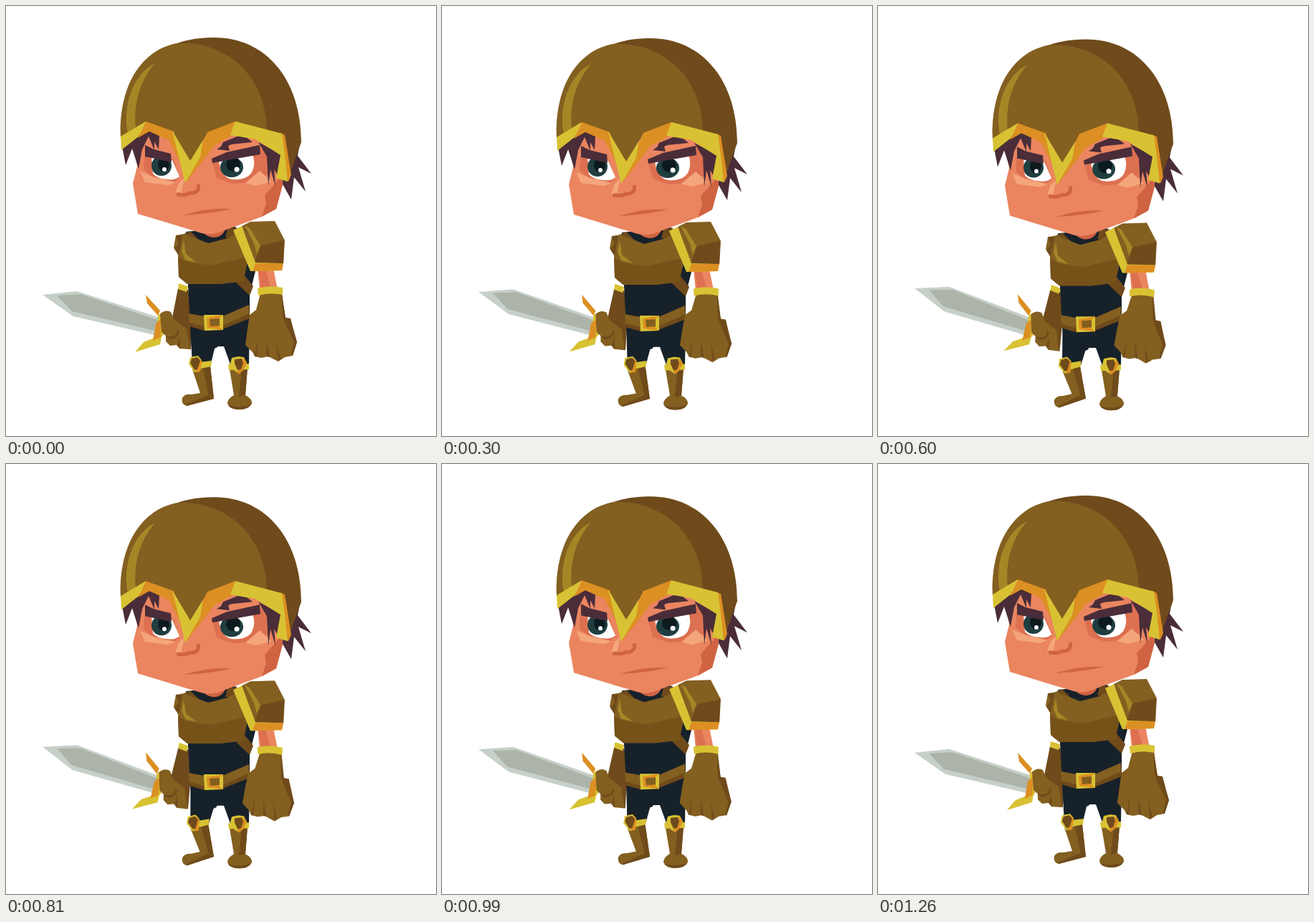
Write an HTML page that moves like this. It is 600 by 600 pixels and loops after 1320 ms.

```html
<!DOCTYPE html>
<html lang="en">
<head>
<meta charset="utf-8">
<title>Knight idle</title>
<style>
html, body { margin: 0; width: 100%; height: 100%; overflow: hidden; background: #fff; }
svg { display: block; width: 100vw; height: 100vh; }
.br { fill: #835f20; }
.dk { fill: #6f4a1b; }
.hi { fill: #a58626; }
.go { fill: #d8c233; }
.or { fill: #dc8f22; }
.nv { fill: #17212a; }
.sk { fill: #ea8560; }
.sh { fill: #d06341; }
.so { fill: #dd7051; }
.li { fill: #f5a57b; }
.ha { fill: #4a2d39; }
.ir { fill: #203e40; }
.pu { fill: #0c1a1e; }
.wh { fill: #fff; }
</style>
</head>
<body>
<svg viewBox="0 0 600 600">
  <g id="swordArm">
    <path fill="#c6d0c9" d="M51 403L99 398L215 435L207 459L94 433Z"/>
    <path fill="#acb4aa" d="M71 404L104 402L214 439L207 453L92 426Z"/>
    <path class="dk" d="M240 394L254 396L260 420L258 479L240 474L231 440Z"/>
    <path class="go" d="M241 387L254 391L252 399L240 395Z"/>
    <path class="go" d="M212 431L219 427L225 452L217 462L215 472L180 483L192 469L207 463L211 447Z"/>
    <path class="or" d="M195 403L215 425L212 432L197 415ZM209 443L216 437L216 462L205 467Z"/>
    <path class="br" d="M215 430Q222 423 230 427L235 438L252 450L257 479L242 478L238 473L229 474L223 468L223 460L217 455Z"/>
    <path class="dk" d="M222 460Q232 463 238 458L239 452L242 455Q240 463 229 465ZM239 473L242 460L243 478Z"/>
  </g>

  <g id="thighL"><path class="nv" d="M257 448L298 448L295 476L291 478L286 499L260 500Z"/></g>
  <g id="shinL">
    <path class="br" d="M260 507L285 502L290 548L252 558Q244 556 246 547Q249 541 259 542L271 540Z"/>
    <path class="dk" d="M275 506L285 502L290 548L252 558Q250 557 253 555L283 543Z"/>
    <path class="go" d="M259 498L287 495L286 503L261 508Z"/>
    <path class="go" d="M257 490L268 488L273 494L271 510L263 511L255 500Z"/>
    <path class="or" d="M268 490L273 495L271 510L264 511Z"/>
    <path class="dk" d="M259 492L267 490L271 495L267 507L263 508L257 498Z"/>
  </g>
  <g id="hips"><path class="nv" d="M257 442L340 436L339 500L313 500L304 475L292 475L259 474Z"/></g>
  <g id="shinR">
    <path class="br" d="M312 507L337 505L334 543Q344 548 343 555Q338 563 326 563Q312 563 309 555Q309 548 318 543Z"/>
    <path class="dk" d="M329 506L337 505L334 543L325 545ZM310 557Q326 562 342 556Q338 563 326 563Q314 563 310 557Z"/>
    <path class="go" d="M310 500L339 499L339 507L311 508Z"/>
    <path class="go" d="M315 491L324 489L332 490L336 498L331 508L325 513L319 509L313 499Z"/>
    <path class="or" d="M331 490L336 498L331 508L325 513L322 511L330 500Z"/>
    <path class="dk" d="M319 493L329 492L331 498L328 507L323 508L319 499Z"/>
  </g>

  <g id="body">
    <path class="nv" d="M251 315L320 308L349 366L340 402L340 440L257 447L254 390Z"/>
    <path class="dk" d="M246 319L257 314L270 327L260 330ZM309 311L322 309L326 325L306 323ZM333 376L345 391L340 404L321 386Z"/>
    <path class="br" d="M237 320L249 318L282 331L309 324L322 317L338 350L331 384L298 388L253 388L241 378L240 347L234 337Z"/>
    <path fill="#765219" d="M240 350L252 357L285 362L334 351L338 353L331 384L298 388L253 388L241 378Z"/>
    <path class="hi" d="M248 326L251 346L266 358L250 354L245 342Z"/>
    <path class="dk" d="M237 320L246 320L241 347L235 339L241 331Z"/>
    <path class="br" d="M255 429L277 433L302 433L339 417L340 435L302 450L277 452L256 446Z"/>
    <path class="dk" d="M256 442L277 447L302 446L340 429V436L302 451L277 453L256 447Z"/>
    <path class="go" d="M276 431L303 431L303 452L277 453Z"/>
    <path class="or" d="M280 435L303 431L303 452L281 449Z"/>
    <path class="go" d="M298 435L303 431L303 452L298 448Z"/>
    <path class="br" d="M284 437L298 436L298 446L285 447Z"/>
  </g>

  <g id="upperArm">
    <path class="sk" d="M351 365L373 366L379 396L354 397Z"/>
    <path class="so" d="M352 368L362 368L370 396L357 397Z"/>
  </g>
  <g id="foreArm">
    <path class="br" d="M355 401L385 400L390 435L397 436L399 446L406 469L400 488L389 490L380 496L366 489L356 491L347 489L344 483L334 473L337 450L340 431L349 424Z"/>
    <path class="dk" d="M384 400L390 435L397 436L406 469L400 488L398 486L402 469L391 446L386 434ZM347 489L351 466L350 489ZM364 489L363 466L368 490ZM380 494L377 468L383 493Z"/>
    <path class="go" d="M351 394Q368 389 386 393L386 403Q368 399 352 404Z"/>
  </g>
  <g id="pad">
    <path class="br" d="M329 307L341 301L375 300L389 327L387 360L346 360Z"/>
    <path class="dk" d="M356 334L388 327L387 360L346 360Z"/>
    <path class="hi" d="M333 306L340 310L355 334L350 346L346 331Z"/>
    <path class="go" d="M317 313L329 307L348 358L386 359L385 369L341 370Z"/>
    <path class="or" d="M348 359L387 359L385 369L344 370Z"/>
  </g>

  <g id="head">
    <path class="ha" d="M411 187L407 209L426 234L408 225L418 259L402 239L398 270L385 247L390 200Z"/>
    <path class="sh" d="M272 313L307 309Q303 323 289 323Q279 322 272 313Z"/>
    <path class="sk" d="M178 190L183 224L177 248L184 290L273 317Q289 321 305 313L357 294L377 283L386 248L380 180L300 165L200 165Z"/>
    <path class="sh" d="M384 238L361 264L363 276L357 294L377 283L386 250Z"/>
    <path class="so" d="M193 209L234 214L242 240L235 246L205 240L192 228Z"/>
    <path class="so" d="M287 214L355 198L372 210L368 234L345 246L316 248L294 240Z"/>
    <path class="li" d="M187 231L207 239L237 246L226 250L194 246ZM354 230L371 245L348 251L334 247ZM241 247L249 240L244 262L236 262Z"/>
    <path class="wh" d="M203 210L232 215L242 238Q237 243 226 242Q211 241 205 234Z"/>
    <ellipse class="ir" cx="217" cy="223" rx="14" ry="14"/>
    <ellipse class="pu" cx="220" cy="221" rx="8" ry="10"/>
    <circle class="wh" cx="221" cy="228" r="3"/>
    <path class="wh" d="M297 217L344 207Q349 220 343 232Q336 243 316 242Q301 240 297 217Z"/>
    <ellipse class="ir" cx="315" cy="225" rx="16" ry="14"/>
    <ellipse class="pu" cx="317" cy="221" rx="10" ry="10"/>
    <circle class="wh" cx="322" cy="228" r="3.5"/>
    <path class="ha" d="M194 194L206 200L230 206L231 218L194 210ZM287 213L308 204L354 194L355 207L288 219Z"/>
    <path fill="none" stroke="#d06341" stroke-width="5" d="M268 249C271 259 262 262 256 261C250 266 243 262 238 263"/>
    <path class="sh" d="M248 292Q280 281 315 283Q291 289 248 292Z"/>
    <path class="ha" d="M162 196L167 222L176 199L185 227L190 200L199 182L207 201L207 189L213 200L214 181L196 172Z"/>
    <path class="ha" d="M303 190L330 179L344 190L315 193L310 195L312 202L294 200L300 196ZM352 190L384 207L380 238L374 228L376 251L369 228L366 251L364 210Z"/>
    <path class="dk" d="M160 184C157 100 205 44 290 44C365 44 412 105 412 190L397 232L388 181L320 163L281 177L257 217L234 177L195 162Z"/>
    <path class="br" d="M160 184C157 112 188 62 238 52C310 48 364 100 364 175L320 163L281 177L257 217L234 177L195 162Z"/>
    <path class="hi" d="M208 80C178 94 162 138 170 178L181 170C177 130 191 99 208 80Z"/>
    <path class="or" d="M195 161L234 175L252 236L227 187L200 175L184 184ZM281 176L320 161L315 181L290 195L274 217L251 246L262 215ZM383 177L389 180L398 236L394 245L388 240Z"/>
    <path class="go" d="M160 182L195 161L185 182L161 201ZM232 174L257 216L275 187L271 211L250 247ZM320 161L385 178L389 207L393 245L377 240L383 208L348 186L313 180Z"/>
  </g>
</svg>
<script>
const LOOP = 1320, STEP = 30;
const parts = {};
document.querySelectorAll('g[id]').forEach(g => parts[g.id] = g);

// One part's pose: sink by dy, then turn by deg around a pivot.
const pose = (id, dy, deg = 0, x = 0, y = 0) =>
  parts[id].setAttribute('transform', `translate(0 ${dy}) rotate(${deg} ${x} ${y})`);

function draw(ms) {
  const t = Math.min(Math.floor(ms % LOOP / STEP) * STEP, LOOP - 2 * STEP);
  const k = (1 - Math.cos(2 * Math.PI * t / LOOP)) / 2;
  pose('head', 2.6 * k);
  pose('body', 2.4 * k);
  pose('pad', 2.5 * k);
  pose('upperArm', 2.4 * k);
  pose('foreArm', 2.4 * k, 3.3 * k, 368, 390);
  pose('swordArm', 0, 3.4 * k, 208, 403);
  pose('hips', 2 * k);
  pose('thighL', 2 * k, 4 * k, 275, 455);
  pose('shinL', 0, -4 * k, 288, 548);
  pose('shinR', 1.3 * k);
}

const start = performance.now();
(function tick() {
  draw(performance.now() - start);
  requestAnimationFrame(tick);
})();
</script>
</body>
</html>
```
